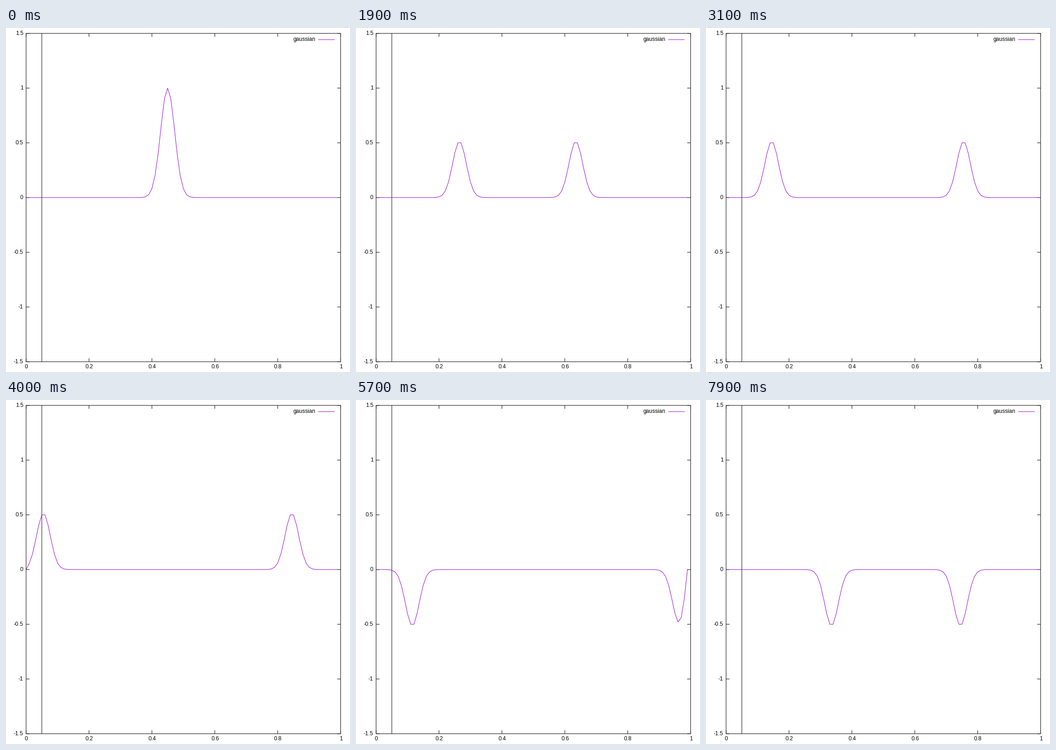
A matplotlib script for the animation above (8 s loop, 748x748 px).

```python
import numpy as np
import matplotlib.pyplot as plt
from matplotlib.animation import FuncAnimation

SIZE, DPI = 748, 88
PX = 72 / DPI  # one pixel in points
LEFT, RIGHT, TOP, BOTTOM = 43.7, 727.6, 11.7, 725.7
TICK = 7.5
PURPLE = "#9400d3"
FRAMES, STEP_MS = 80, 100
POINTS = 100

plt.rcParams["font.family"] = "Liberation Sans"
plt.rcParams["font.size"] = 12 * PX


def col(x):
    return LEFT + x * (RIGHT - LEFT)


def row(y):
    return BOTTOM - (y + 1.5) / 3 * (BOTTOM - TOP)


def simulate(steps):
    """Wave equation on a string with fixed ends, Courant number 1."""
    x = np.arange(POINTS) / POINTS
    now = np.exp(-1000 * (x - 0.45) ** 2)
    now[[0, -1]] = 0
    old = now.copy()
    states = [now]
    for _ in range(steps):
        new = np.zeros(POINTS)
        new[1:-1] = now[2:] + now[:-2] - old[1:-1]
        old, now = now, new
        states.append(now)
    return x, states


fig = plt.figure(figsize=(SIZE / DPI, SIZE / DPI), dpi=DPI, facecolor="white")
ax = fig.add_axes([0, 0, 1, 1], xlim=(0, SIZE), ylim=(SIZE, 0))
ax.axis("off")


def stroke(xs, ys, color="black", z=1):
    """Smooth one-pixel line through stage coordinates."""
    line, = ax.plot(xs, ys, color=color, lw=PX, snap=False, zorder=z,
                    solid_capstyle="butt", solid_joinstyle="miter")
    return line


def label(x, y, text, align):
    ax.text(x, y, text, ha=align, va="baseline", color="black")


for v in np.arange(6) / 5:
    c = col(v)
    stroke([c, c], [TOP, TOP + TICK])
    stroke([c, c], [BOTTOM - TICK, BOTTOM])
    label(c + 0.5, 740, f"{v:g}", "center")

for v in np.arange(-3, 4) / 2:
    r = row(v)
    stroke([LEFT, LEFT + TICK], [r, r])
    stroke([RIGHT - TICK, RIGHT], [r, r])
    label(37.5, r + 3.3, f"{v:g}", "right")

stroke([col(0.05)] * 2, [TOP, BOTTOM])
stroke([LEFT, RIGHT, RIGHT, LEFT, LEFT], [TOP, TOP, BOTTOM, BOTTOM, TOP], z=3)

label(672.5, 28, "gaussian", "right")
stroke([679, 714.5], [25.3, 25.3], PURPLE)

grid, states = simulate(FRAMES)
curve = stroke(col(grid), row(states[0]), PURPLE, z=2)


def draw(k):
    curve.set_ydata(row(states[max(k - 1, 0)]))
    return [curve]


anim = FuncAnimation(fig, draw, frames=FRAMES, interval=STEP_MS,
                     repeat=True, repeat_delay=0)
plt.show()
```
